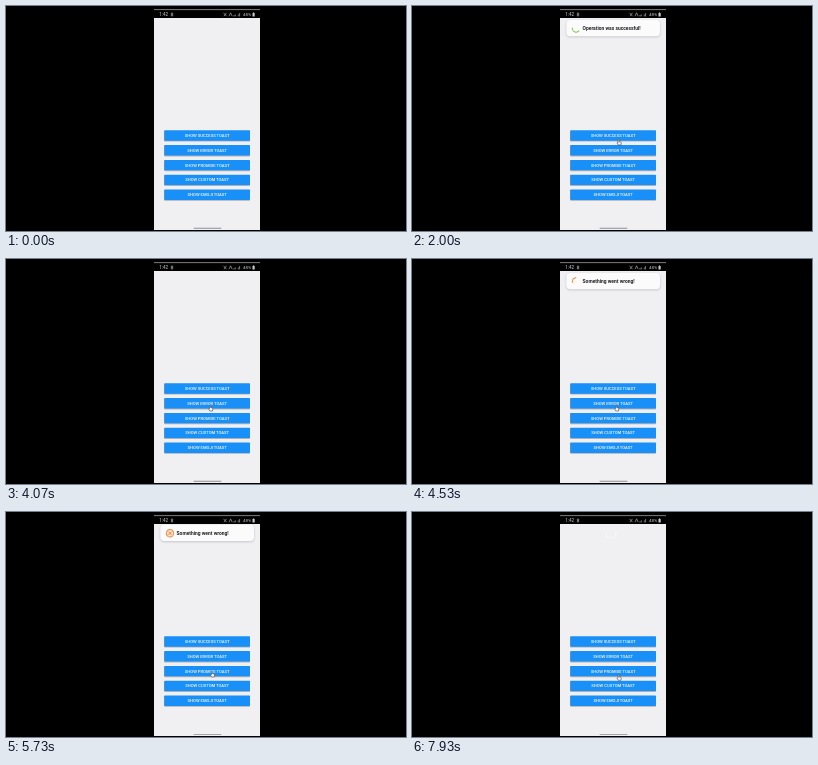
Animation of 400 by 225 pixels, one loop 8000 ms. Source, as an HTML page:

```html
<!DOCTYPE html>
<html lang="en">
<head>
<meta charset="utf-8">
<title>Toast demo</title>
<style>
  html, body { margin: 0; width: 100%; height: 100%; overflow: hidden; background: #000; }
  svg { display: block; width: 100vw; height: 100vh; font-family: Roboto, sans-serif; }
</style>
</head>
<body>
<svg id="stage" viewBox="0 0 400 225">
  <defs>
    <filter id="soft" x="-20%" y="-60%" width="140%" height="240%"><feGaussianBlur stdDeviation="1.3"/></filter>
    <filter id="low" x="-5%" y="-30%" width="110%" height="180%"><feGaussianBlur stdDeviation=".6"/></filter>
  </defs>
  <rect width="400" height="225"/>
  <rect x="148" y="3.2" width="106" height=".9" fill="#8b8b8d"/>
  <rect x="148" y="12" width="106" height="212" fill="#f0eff2"/>
  <g fill="#c9c9c9" font-size="4.6">
    <text x="153.3" y="10.3">1:42</text>
    <text x="237" y="10.3" font-size="4.4">48%</text>
    <rect x="246.5" y="7" width="2.2" height="3.6" rx=".4"/>
    <rect x="247.1" y="6.4" width="1" height=".8"/>
    <path d="M165 7.2l2 2.6M167 7.2l-2 2.6M166 6.4v4.2M217.5 6.8l3 3.4M220.5 6.8l-2.6 3.4M223 10.2l1.6-3.4 1.6 3.4M228 10.4v-1.4M229.3 10.4v-2M232.3 10.4v-2M233.6 10.4v-3.4" fill="none" stroke="#aaa" stroke-width=".7"/>
  </g>
  <g id="buttons"></g>
  <rect id="handle" x="187.5" width="28" rx=".4" fill="#8e8e92"/>
  <circle id="spin" cx="199" cy="21" r="5" fill="none" stroke="#fff" stroke-width="1.6" stroke-dasharray="20 12"/>
  <g id="toasts"></g>
  <path id="hand" d="M-.9 .6V-2.5q.5-.8 1 0V-.5l1.8.5q.5.2.4.9L1.9 3H-.7L-2 .9q.2-.7 1.1-.3z" fill="#f7f7f7" stroke="#34383f" stroke-width=".55" stroke-linejoin="round"/>
</svg>
<script>
const LOOP = 8000;
const $ = id => document.getElementById(id);
const clamp = v => Math.max(0, Math.min(1, v));
const part = (t, a, b) => clamp((t - a) / (b - a));
const ease = p => p * p * (3 - 2 * p);
const backOut = p => 1 + 2.4 * (p - 1) ** 3 + 1.4 * (p - 1) ** 2;

function add(parent, tag, attrs, text) {
  const el = document.createElementNS('http://www.w3.org/2000/svg', tag);
  set(el, attrs);
  if (text) el.textContent = text;
  return parent.appendChild(el);
}
function set(el, attrs) {
  for (const k in attrs) el.setAttribute(k, attrs[k]);
}

const presses = ['SUCCESS', 'ERROR', 'PROMISE', 'CUSTOM', 'EMOJI'].map((name, i) => {
  const y = 124.3 + i * 14.8;
  const box = { x: 158.2, y, width: 85.8, height: 10.4, rx: .7 };
  add($('buttons'), 'rect', { ...box, y: y + .9, fill: '#777e88', opacity: .55, filter: 'url(#low)' });
  add($('buttons'), 'rect', { ...box, fill: '#1990f7' });
  const press = add($('buttons'), 'rect', { ...box, fill: '#fff', opacity: 0 });
  add($('buttons'), 'text', {
    x: 201.2, y: y + 6.75, fill: '#eef6ff', 'font-size': 4.15, 'font-weight': 500, 'text-anchor': 'middle'
  }, `SHOW ${name} TOAST`);
  return press;
});

function makeToast(o) {
  const g = add($('toasts'), 'g', {});
  const box = { x: 154.3, y: 14, width: 93.7, height: 16.2, rx: 4 };
  add(g, 'rect', { ...box, y: 14.8, fill: '#77777d', opacity: .4, filter: 'url(#soft)' });
  add(g, 'rect', { ...box, fill: '#fbfbfc' });
  add(g, 'text', { x: 170.6, y: 24.4, 'font-size': 4.92, 'font-weight': 700, fill: '#202124' }, o.text);
  const icon = add(g, 'g', { fill: 'none', stroke: o.color, 'stroke-width': 1 });
  const disc = add(icon, 'circle', { cx: 164, cy: 22.5, r: 3.7, fill: o.tint, stroke: 'none' });
  const ring = add(icon, 'circle', {
    cx: 164, cy: 22.5, r: 3.7, pathLength: 100,
    transform: `translate(164 22.5) scale(1 ${o.turn}) rotate(${o.from}) translate(-164 -22.5)`
  });
  const mark = add(icon, 'path', { d: o.mark, pathLength: 100 });
  return { ...o, g, disc, ring, mark };
}

const toasts = [
  makeToast({
    text: 'Operation was successful!', color: '#86bd58', tint: '#e3f1d6', turn: -1, from: 165,
    mark: 'M162.2 22.6l1.3 1.4 2.4-2.7', start: 1400, draw: [1680, 2400], check: [2330, 2670], end: 3200, leave: 0
  }),
  makeToast({
    text: 'Something went wrong!', color: '#ea8740', tint: '#fbdfc6', turn: 1, from: 160,
    mark: 'M162.5 21l3 3M165.5 21l-3 3', start: 4100, draw: [4330, 4960], check: [4900, 5130], end: 5870, leave: 170
  })
];

function drawToast(o, t) {
  const on = t >= o.start && t < o.end;
  set(o.g, { visibility: on ? 'visible' : 'hidden' });
  if (!on) return;
  const enter = part(t, o.start, o.start + 270);
  const out = o.leave ? part(t, o.end - o.leave, o.end) : 0;
  const s = .9 + .1 * backOut(enter);
  const y = -7 * (1 - ease(enter)) - 6.5 * out;
  set(o.g, {
    transform: `translate(201 ${22 + y}) scale(${s}) translate(-201 -22)`,
    opacity: Math.min(1, enter * 2 + .1) * (1 - Math.max(0, out - .4) / .6)
  });
  const ring = 100 * part(t, ...o.draw), mark = part(t, ...o.check);
  set(o.ring, { 'stroke-dasharray': `${ring} 200`, opacity: ring ? 1 : 0 });
  set(o.mark, { 'stroke-dasharray': `${mark * 100} 200`, opacity: mark ? 1 : 0 });
  set(o.disc, { opacity: mark });
}

// time, x, y
const route = [
  [70, 241, 134], [130, 238, 136], [400, 238, 136], [600, 240, 92], [930, 207, 136],
  [3200, 207, 136], [3700, 204.5, 149], [4560, 204.5, 149], [4670, 205.5, 158],
  [5270, 205.5, 158], [5600, 206.3, 162], [5730, 206.3, 162], [5870, 207, 165.3]
];
function handAt(t) {
  let i = 0;
  while (i < route.length - 2 && t > route[i + 1][0]) i++;
  const [a, x, y] = route[i], [b, u, v] = route[i + 1];
  const p = ease(part(t, a, b));
  return `translate(${x + (u - x) * p} ${y + (v - y) * p})`;
}

const clicks = [1330, 4070, 6130];

function render(t) {
  toasts.forEach(o => drawToast(o, t));
  clicks.forEach((c, i) => {
    const p = part(t, c, c + 300);
    set(presses[i], { opacity: .2 * Math.sin(Math.PI * p) });
  });
  set($('hand'), { transform: handAt(t), visibility: t < 70 ? 'hidden' : 'visible' });
  const late = t >= 5400;
  set($('handle'), { y: late ? 222.1 : 221.8, height: late ? .6 : .9 });
  set($('spin'), { opacity: .3 * part(t, 6930, 7200), transform: `rotate(${t * .45 % 360} 199 21)` });
}

const begin = performance.now();
function tick() {
  render((performance.now() - begin) % LOOP);
  requestAnimationFrame(tick);
}
tick();
</script>
</body>
</html>
```
